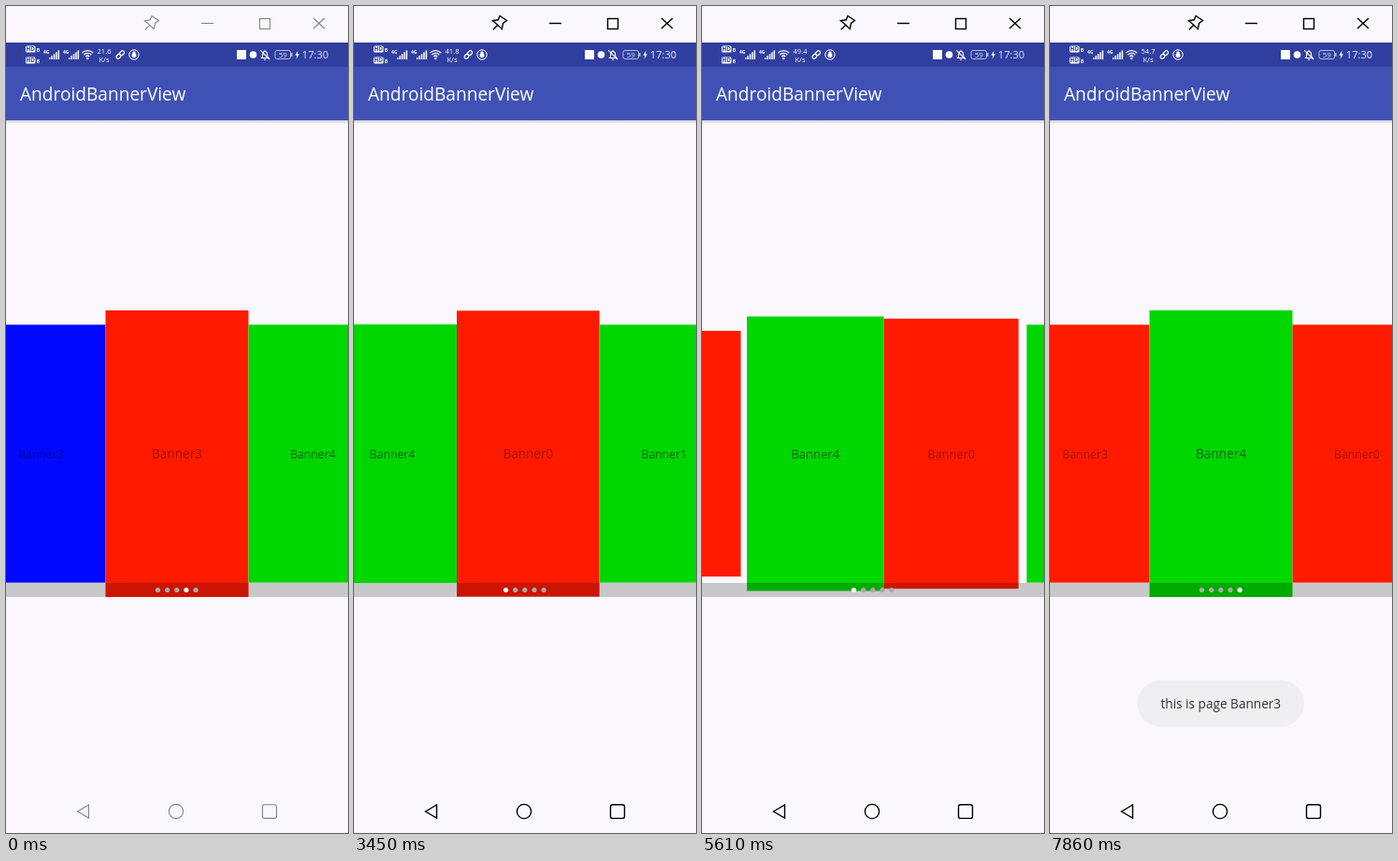
An HTML page with a canvas for the animation above (8 s loop, 366x883 px).

```html
<!DOCTYPE html>
<html lang="en">
<head>
<meta charset="utf-8">
<title>Banner carousel</title>
<style>
html, body { margin: 0; width: 100%; height: 100%; overflow: hidden; background: #faf8fc; }
canvas { display: block; }
</style>
</head>
<body>
<canvas id="stage" width="366" height="883"></canvas>
<script>
const ctx = document.getElementById('stage').getContext('2d');
const LOOP = 8000, STEP = 30;
const PAGE_W = 153, PAGE_H = 306, LEFT = 106.5, MID_Y = 478;
const FONT = '"Open Sans", "Noto Sans", sans-serif';
const BG = '#faf8fc';
const RED = ['#ff1a00', 0.36], GREEN = ['#00d600', 0.54], BLUE = ['#0008ff', 0.36];
const PAGES = [RED, GREEN, BLUE, RED, GREEN];
const DRAG = [[3420, 0], [3450, 3.5], [3700, 17], [3930, 34.5], [4020, 50], [4050, 53]];

const clamp = (v, a = 0, b = 1) => Math.min(b, Math.max(a, v));

// Value of the step that began last: rows are [start, value]
const at = (t, rows) => rows.filter(r => t >= r[0]).pop()[1];

function along(points, t) {
  if (t <= points[0][0]) return points[0][1];
  for (let i = 1; i < points.length; i++) {
    const [t0, a] = points[i - 1], [t1, b] = points[i];
    if (t <= t1) return a + (b - a) * (t - t0) / (t1 - t0);
  }
  return points[points.length - 1][1];
}

const slide = (t, start) => 1 - (1 - clamp((t - start + 15) / 200)) ** 5;

function position(t) {
  if (t < 3420) return 3 + slide(t, 1440) + slide(t, 3240);
  if (t < 5610) return 5 - along(DRAG, t) / PAGE_W;
  if (t < 7600) return 3 + (218 / PAGE_W) * (1 - clamp((t - 5610) / 270)) ** 3;
  return 3 + slide(t, 7650);
}

function rect(x, y, w, h, color) {
  ctx.fillStyle = color;
  ctx.fillRect(x, y, w, h);
}

function text(str, x, y, size, color, align = 'center', weight = 400) {
  ctx.font = `${weight} ${size}px ${FONT}`;
  ctx.textAlign = align;
  ctx.fillStyle = color;
  ctx.fillText(str, x, y);
}

function shape(points, close) {
  ctx.beginPath();
  points.forEach(([x, y]) => ctx.lineTo(x, y));
  if (close) ctx.closePath();
}

function line(points, color, width = 1, close = false) {
  shape(points, close);
  ctx.strokeStyle = color;
  ctx.lineWidth = width;
  ctx.stroke();
}

function round(x, y, w, h, r) {
  ctx.beginPath();
  ctx.roundRect(x, y, w, h, r);
}

function disc(x, y, r, color) {
  ctx.beginPath();
  ctx.arc(x, y, r, 0, 7);
  ctx.fillStyle = color;
  ctx.fill();
}

function arc(x, y, r, color, width, a = 0, b = Math.PI * 2) {
  ctx.beginPath();
  ctx.arc(x, y, r, a, b);
  ctx.strokeStyle = color;
  ctx.lineWidth = width;
  ctx.stroke();
}

function windowBar(focused) {
  const c = focused ? '#000' : '#858487', w = focused ? 1.4 : 1.1;
  line([[156, 10.5], [163.5, 15.5], [159.5, 18.5], [158.3, 24.5], [153.8, 20.3],
    [148.5, 15.8], [154.3, 14.8]], c, w, true);
  line([[153.8, 20.3], [148.8, 25.3]], c, w);
  line([[209, 18.5], [222, 18.5]], c, w);
  ctx.strokeRect(271.5, 13.5, 11, 11);
  line([[329, 13], [341, 24]], c, w);
  line([[341, 13], [329, 24]], c, w);
}

function navBar(focused) {
  const c = focused ? '#000' : '#858487', w = focused ? 1.4 : 1.1;
  line([[76.5, 860], [88.5, 853], [88.5, 867]], c, w, true);
  arc(182, 860, 7.6, c, w);
  round(274.5, 852.8, 15, 14.6, 2.2);
  ctx.stroke();
}

function signal(x) {
  text('4G', x, 51, 5, '#fff', 'left', 700);
  for (let i = 0; i < 5; i++) rect(x + 6 + i * 2.4, 55 - i * 1.9, 1.5, 2 + i * 1.9, '#fff');
}

function statusBar(speed) {
  rect(0, 39, 366, 26, '#303f9f');
  for (const y of [42.5, 54.5]) {
    round(21, y, 10.5, 7, 1.5);
    ctx.fillStyle = '#fff';
    ctx.fill();
    text('HD', 26.2, y + 5.8, 6.2, '#303f9f', 'center', 700);
    text('B', 34.5, y + 6.5, 5, '#fff', 'center', 700);
  }
  signal(40);
  signal(61);
  for (const r of [2.8, 5.6, 8.4]) arc(87.3, 56, r, '#fff', 1.3, -2.37, -0.77);
  disc(87.3, 56, 1.2, '#fff');
  text(speed, 105, 50.6, 7.6, '#fff');
  text('K/s', 105, 59.6, 7.6, '#fff');

  ctx.save();
  ctx.translate(122.3, 52);
  ctx.rotate(-Math.PI / 4);
  ctx.strokeStyle = '#fff';
  ctx.lineWidth = 1.2;
  for (const x of [-5.2, -0.3]) {
    round(x, -1.9, 5.5, 3.8, 1.9);
    ctx.stroke();
  }
  ctx.restore();

  arc(137, 52, 5.2, '#fff', 1);
  round(134.6, 50, 4.8, 5, 1.8);
  ctx.fillStyle = '#fff';
  ctx.fill();
  rect(135.6, 48.6, 2.8, 2, '#fff');

  rect(247, 47, 10, 10, '#fff');
  disc(264.5, 52, 3.8, '#fff');
  line([[273.5, 55.5], [274.5, 54], [274.8, 50], [277, 47.8], [279.4, 50], [279.8, 54], [281, 55.5]], '#fff', 1.1, true);
  line([[272.3, 47.3], [282, 57]], '#fff', 1.1);
  line([[276, 57.2], [278.2, 57.2]], '#fff', 1);

  round(288, 47.5, 16.5, 9, 2);
  ctx.strokeStyle = '#c5cae9';
  ctx.lineWidth = 0.9;
  ctx.stroke();
  rect(305.2, 50, 1.3, 4, '#c5cae9');
  text('59', 296.2, 55, 8, '#e2e5f5');
  shape([[312.5, 47.5], [309.4, 52.7], [311.3, 52.7], [310.6, 56.8], [313.8, 51.3], [311.8, 51.3]], true);
  ctx.fillStyle = '#fff';
  ctx.fill();
  text('17:30', 331, 56, 11.1, '#e8eaf6');
}

function appBar() {
  rect(0, 65, 366, 57, '#3f51b5');
  text('AndroidBannerView', 15, 101, 19.1, '#fff', 'left');
  const g = ctx.createLinearGradient(0, 122, 0, 126);
  g.addColorStop(0, 'rgba(0,0,0,.18)');
  g.addColorStop(1, 'rgba(0,0,0,0)');
  rect(0, 122, 366, 4, g);
}

// Pages shrink towards the edge they share with the centre page
function pages(pos) {
  const first = Math.floor(pos) - 1;
  for (let i = first; i < first + 5; i++) {
    const d = i - pos;
    const s = d < 0 ? 1 + 0.1 * d : 1 - 0.1 * Math.min(d, 1);
    const w = PAGE_W * s, h = PAGE_H * s;
    const x = LEFT + PAGE_W * d + (d < 0 ? PAGE_W - w : 0);
    const n = i % 5;
    const [color, ink] = PAGES[n];
    rect(x, MID_Y - h / 2, w, h, color);
    text('Banner' + n, x + w / 2, MID_Y + 5 * s, 13.6 * s, `rgba(0,0,0,${ink})`);
  }
}

function indicator(active) {
  rect(0, 616, 366, 15, 'rgba(0,0,0,.2)');
  for (let i = 0; i < 5; i++) {
    disc(162.5 + i * 10.15, 623.5, 2.6, i === active ? '#fff' : '#aaa');
  }
}

function toast(alpha) {
  if (!alpha) return;
  ctx.globalAlpha = alpha;
  round(93.5, 720, 178.5, 49.5, 24.75);
  ctx.fillStyle = '#efeef1';
  ctx.fill();
  text('this is page Banner3', 182.8, 750, 13.6, '#333');
  ctx.globalAlpha = 1;
}

function draw(now) {
  const t = Math.floor((now % LOOP) / STEP) * STEP;
  const focused = t >= 3390;
  rect(0, 0, 366, 883, BG);
  windowBar(focused);
  statusBar(at(t, [[0, '21.6'], [2100, '41.8'], [5010, '49.4'], [7860, '54.7']]));
  appBar();
  pages(position(t));
  indicator(at(t, [[0, 3], [1440, 4], [3240, 0], [5700, 3], [7650, 4]]));
  toast(clamp((t - 6660) / 120));
  navBar(focused);
}

function tick() {
  draw(performance.now());
  requestAnimationFrame(tick);
}
tick();
</script>
</body>
</html>
```
